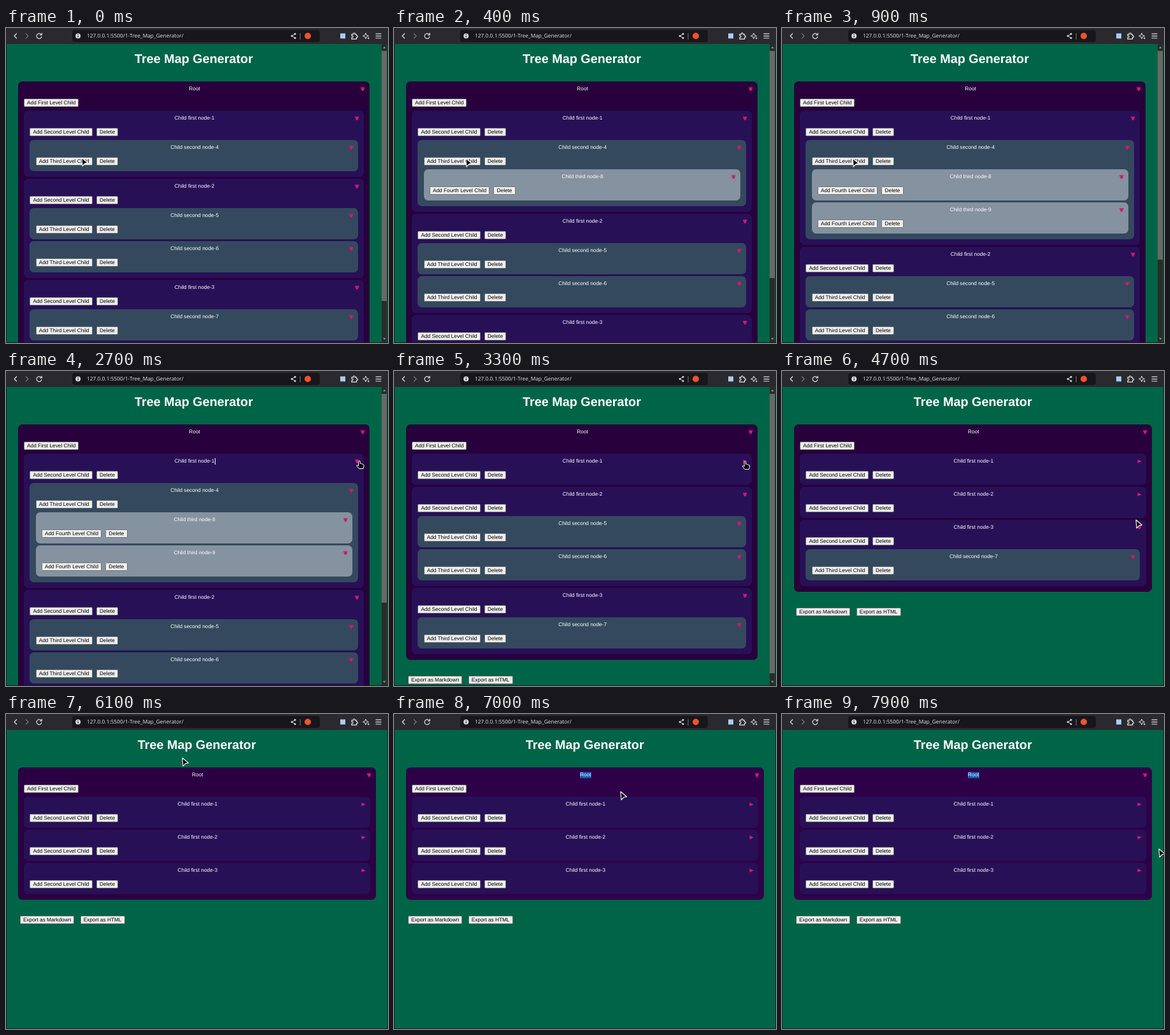
Recreate the animation shown at these times as an HTML page. Size 600 by 495 pixels, loop 8 s.

```html
<!DOCTYPE html>
<html lang="en">
<head>
<meta charset="utf-8">
<title>Tree Map Generator</title>
<style>
  html, body { margin: 0; width: 100%; height: 100%; overflow: hidden; background: #1c1c20; }
  #stage { position: relative; width: 600px; height: 495px; overflow: hidden; background: #1c1c20;
    font: 8.27px/12px "Liberation Sans", Arial, sans-serif; color: #fff; text-rendering: geometricPrecision; }
  #stage * { box-sizing: border-box; }
  #stage div, #stage svg { position: absolute; white-space: nowrap; }
  #page { left: 1px; top: 25px; width: 598px; height: 469px; background: #006447; }
  #view { left: 0; top: 0; width: 600px; height: 494px; overflow: hidden; }
  h1 { position: absolute; margin: 0; top: 37px; left: 0; text-align: center;
    font-size: 19.8px; line-height: 25px; font-weight: bold; }
  .box { border-radius: 6.5px; }
  .label { text-align: center; }
  .label span { position: relative; }
  .picked { background: #1456b0; padding: 0 .3px; line-height: 10px; display: inline-block; }
  .caret::after { content: ""; position: absolute; right: -1px; top: 0; width: .8px; height: 10px; background: #fff; }
  .row { display: flex; gap: 6.3px; height: 13px; }
  .row b { font-weight: normal; color: #000; background: #efefef; border: .8px solid #767676;
    border-radius: 1.8px; padding: 0 4.1px; line-height: 11.6px; height: 13px; }
  .row.wide { gap: 9.3px; }
  .url { left: 127px; top: 6px; font: 8.4px/13px "Open Sans", "Noto Sans", sans-serif; color: #e6e6ea; }
</style>
</head>
<body>
<div id="stage">
  <div id="page"></div>
  <div id="view"></div>
  <svg width="600" height="25" style="left:0;top:0" fill="none" stroke="#e4e4e8" stroke-width="1.2">
    <rect width="600" height="25" fill="#29292e" stroke="none"/>
    <rect x="104" y="3" width="389" height="19" rx="4" fill="#17171b" stroke="none"/>
    <path d="M17 8.5l-4 4 4 4"/>
    <path d="M31 8.5l4 4-4 4" stroke="#77777d"/>
    <path d="M55.3 10.2A4 4 0 1 0 56 13.4M56.2 7.8v3.2h-3.2"/>
    <circle cx="113.2" cy="12.5" r="4" fill="#d8d8dc" stroke="none"/>
    <path d="M113.2 12v2.6M113.2 10v1" stroke="#17171b"/>
    <path d="M454 9.4l-5 3.1 5 3.1" stroke-width=".9"/>
    <g fill="#d8d8dc" stroke="none">
      <circle cx="454" cy="9.3" r="1.5"/><circle cx="449" cy="12.5" r="1.5"/><circle cx="454" cy="15.7" r="1.5"/>
    </g>
    <path d="M462 8v10" stroke="#77777d" stroke-width="1"/>
    <circle cx="474" cy="12.5" r="5" fill="#f4512c" stroke="none"/>
    <rect x="525" y="8.5" width="8" height="8" fill="#a9cdf8" stroke="none"/>
    <path d="M543 9.8h2.4a1.5 1.5 0 1 1 2.8 0h2.3v2.3a1.5 1.5 0 1 1 0 2.8v2.4h-7.5v-2.4a1.5 1.5 0 1 0 0-2.8z"/>
    <path d="M565 8l1.3 3.2 3.2 1.3-3.2 1.3-1.3 3.2-1.3-3.2-3.2-1.3 3.2-1.3z" stroke-width="1"/>
    <path d="M569.3 14.5v3M567.8 16h3" stroke-width=".9"/>
    <path d="M580.5 9.2h9M580.5 12.6h9M580.5 16h9"/>
  </svg>
  <div class="url">127.0.0.1:5500/1-Tree_Map_Generator/</div>
  <svg id="pointer" width="24" height="26" viewBox="-6 -3 24 26" style="left:-6px;top:-3px" stroke="#fff" stroke-linejoin="round">
    <path id="arrow" d="M0 0L9.5 8 5.2 8.6 1 13Z" fill="#000" stroke-width="1.1"/>
    <path id="hand" d="M-1.3 .8Q0-.8 1.1 .8V4.5Q2.4 3.6 3.4 5 4.7 4.4 5.3 5.7 6.8 5.4 7 7V9.2L5.9 12.5H-.6L-4.3 7.7Q-3.5 6-1.3 8Z" fill="#000" stroke-width="1"/>
  </svg>
</div>
<script>
const LOOP = 8000, STEP = 100;
const INSET = 9.3, LEAF = 49, GAP = 3, HEAD = 46;
const FILL = ['#27003c', '#281057', '#34495e', '#8592a0'];
const LEVEL = ['First', 'Second', 'Third', 'Fourth'];
const ORDINAL = ['', 'first', 'second', 'third'];

// start time and what is different from then on
const EVENTS = [
  [0, {}],
  [400, { third: [8] }],
  [700, { third: [8, 9] }],
  [2500, { caret: true }],
  [2900, { caret: false, shut: [1] }],
  [4100, { shut: [1, 2] }],
  [4900, { shut: [1, 2, 3] }],
  [5500, { rootFill: '#2b0042' }],
  [6400, { rootFill: '#2e0048' }],
  [6800, { picked: true }]
];

// time, x, y, hand shape
const PATH = [
  [0, 119, 204, 0], [300, 113, 205, 0], [1000, 111, 205, 0], [1800, 500, 215, 0],
  [2300, 555, 142, 1], [2700, 555, 141, 1], [3000, 551.5, 142, 1], [3400, 551.5, 142, 0],
  [3800, 551, 192, 1], [4200, 552, 192, 0], [4500, 556, 234, 0], [4700, 556, 234, 0],
  [4800, 560, 243, 1], [5000, 560, 243, 0], [5400, 400, 110, 0], [5800, 290, 68, 0],
  [6100, 277, 69, 0], [6400, 312, 93, 0], [6600, 312, 94, 0], [6800, 292, 94, 0],
  [7200, 420, 150, 0], [7600, 592, 212, 0], [8000, 592, 212, 0]
];

const $ = id => document.getElementById(id);
const px = (x, y, w, h) => `left:${x}px;top:${y}px;` + (w ? `width:${w}px;` : '') + (h ? `height:${h}px;` : '');
const buttons = (x, y, names, cls = '') =>
  `<div class="row ${cls}" style="${px(x, y)}">${names.map(n => `<b>${n}</b>`).join('')}</div>`;

function triangle(x, y, shut) {
  const d = shut ? 'M1.5 1L8 4 1.5 7Z' : 'M.8 1.2H7.6L5.6 6.8H3Z';
  return `<svg width="9" height="8" style="${px(x - 4.3, y - 4)}"><path d="${d}" fill="#d01873"/></svg>`;
}

function tree(third) {
  const node = (id, ...kids) => ({ id, kids });
  return node(0,
    node(1, node(4, ...third.map(id => node(id)))),
    node(2, node(5), node(6)),
    node(3, node(7)));
}

function drawNode(node, depth, top, right, s) {
  const x = 18.7 + INSET * depth, edge = right - INSET * depth;
  const shut = s.shut.includes(node.id);
  let bottom = top + LEAF, inner = '';
  if (node.kids.length && !shut) {
    let y = top + HEAD;
    for (const kid of node.kids) {
      const part = drawNode(kid, depth + 1, y, right, s);
      inner += part.html;
      y = part.bottom + GAP;
    }
    bottom = y - GAP + 9;
  }
  const name = depth ? `Child ${ORDINAL[depth]} node-${node.id}` : 'Root';
  const cls = depth === 0 && s.picked ? 'picked' : node.id === 1 && s.caret ? 'caret' : '';
  const names = [`Add ${LEVEL[depth]} Level Child`].concat(depth ? 'Delete' : []);
  const fill = depth ? FILL[depth] : s.rootFill;
  const html =
    `<div class="box" style="${px(x, top, edge - x, bottom - top)}background:${fill}"></div>` +
    `<div class="label" style="${px(x + 1, top + 6, edge - x)}"><span class="${cls}">${name}</span></div>` +
    triangle(edge - 10.8, top + 12, shut) +
    buttons(x + INSET, top + 26.6, names) + inner;
  return { html, bottom };
}

function scrollbar(content) {
  const thumb = 448 * 469 / content;
  return `<div style="${px(589.5, 25, 8.5, 469)}background:#2b2b2b"></div>` +
    `<div style="${px(590, 36, 7.5, thumb)}background:#686868"></div>` +
    `<svg width="9" height="469" style="${px(589.5, 25)}" fill="#8a8a8a"><path d="M2 7L4.3 4 6.6 7ZM2 462H6.6L4.3 465Z"/></svg>`;
}

function drawPage(s) {
  const root = tree(s.third);
  let right = 571.5;
  let part = drawNode(root, 0, 84, right, s);
  const content = part.bottom + 25;
  const scrolls = content > 469;
  if (!scrolls) part = drawNode(root, 0, 84, right = 581, s);
  $('view').innerHTML =
    `<h1 style="width:${right + 18.5}px">Tree Map Generator</h1>` + part.html +
    buttons(21.8, part.bottom + 24.8, ['Export as Markdown', 'Export as HTML'], 'wide') +
    (scrolls ? scrollbar(content) : '');
}

function movePointer(t) {
  const i = PATH.findIndex((p, k) => k && t < p[0]);
  const a = PATH[i - 1], b = PATH[i];
  const u = (t - a[0]) / (b[0] - a[0]), e = u * u * (3 - 2 * u);
  const x = a[1] + (b[1] - a[1]) * e, y = a[2] + (b[2] - a[2]) * e;
  $('pointer').style.transform = `translate(${x}px,${y}px)`;
  $('hand').style.display = a[3] ? '' : 'none';
  $('arrow').style.display = a[3] ? 'none' : '';
}

let shown = -1;
function frame() {
  const t = Math.floor((performance.now() - start) % LOOP / STEP) * STEP;
  const past = EVENTS.filter(e => e[0] <= t);
  if (past.length !== shown) {
    shown = past.length;
    drawPage(Object.assign({ third: [], shut: [], rootFill: FILL[0] }, ...past.map(e => e[1])));
  }
  movePointer(t);
  requestAnimationFrame(frame);
}
const start = performance.now();
frame();
</script>
</body>
</html>
```
